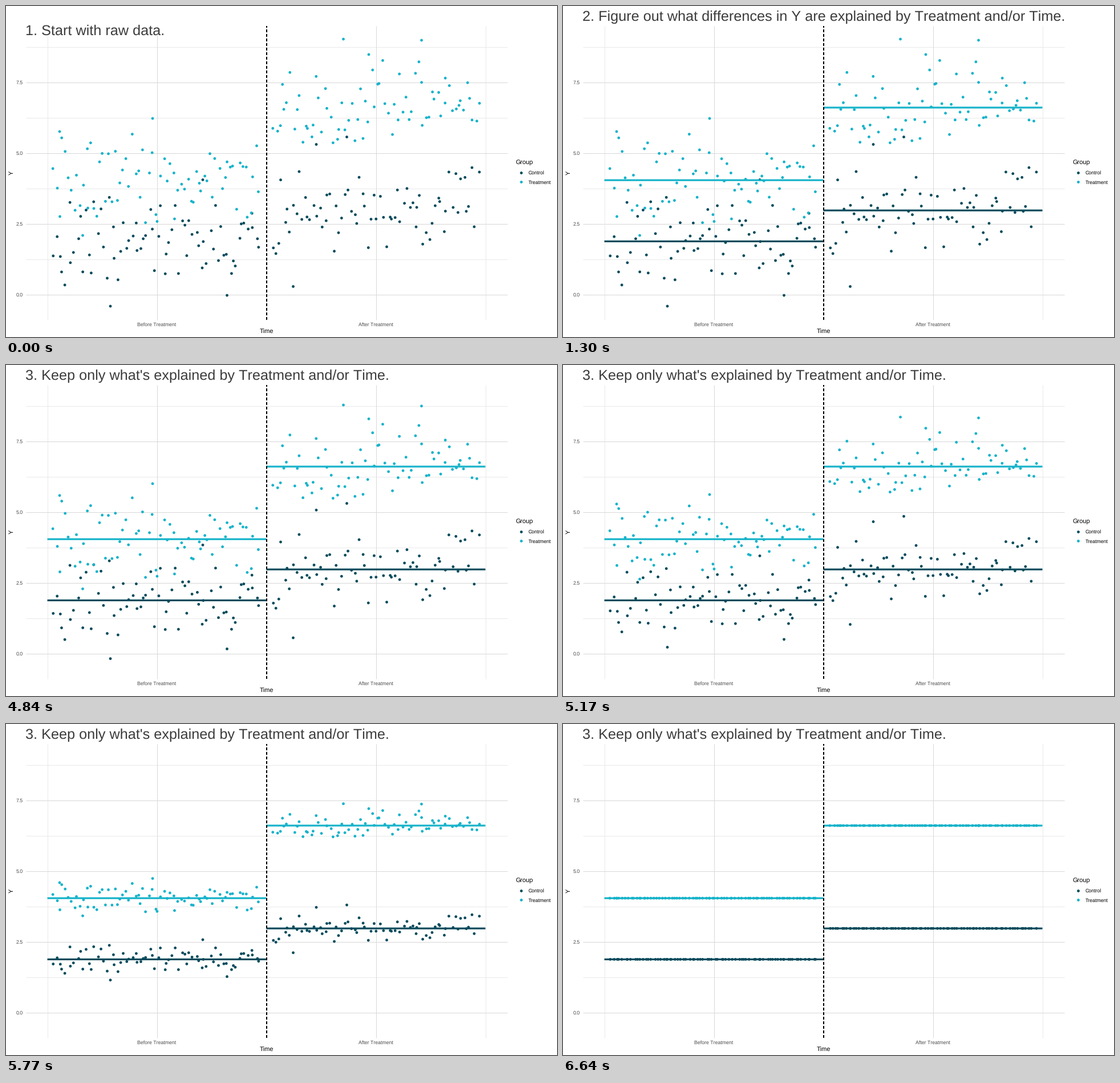
A matplotlib script for the animation above (8 s loop, 966x580 px).

```python
import math

import matplotlib.pyplot as plt
import numpy as np
from matplotlib.animation import FuncAnimation

W, H, DPI = 966, 580, 100
LOOP, STEP = 8000, 20
PX = 72 / DPI  # points per pixel

DARK, TEAL, GREY = "#064B5C", "#16B3CA", "#4D4D4D"
X_BEFORE, X_MID, X_AFTER, X_UNIT = 264.5, 456.7, 648.5, 384
Y_ZERO, Y_UNIT = 506.3, 49.65
PER_GROUP, SPREAD = 75, 43

# Start time, baseline, text
TITLES = [
    (0, 50.6, "1. Start with raw data."),
    (500, 25.6, "2. Figure out what differences in Y are explained "
                "by Treatment and/or Time."),
    (4440, 25.6, "3. Keep only what's explained by Treatment and/or Time."),
]
LINES_AT = 1300
SHRINK_AT, TICK, TICKS = 4440, 200 / 3, 34

# Colour, x centre, mean height, a few extreme points
GROUPS = [
    (DARK, X_BEFORE, 412.4, [(183, 526), (387.5, 507), (345, 304.5)]),
    (DARK, X_AFTER, 358.2, [(503.5, 491.5), (597.5, 229.5), (544, 242.5)]),
    (TEAL, X_BEFORE, 305.2, [(257, 197), (94, 220), (134.5, 402)]),
    (TEAL, X_AFTER, 178.0, [(591.5, 58), (728.5, 60), (636, 85)]),
]

plt.rcParams.update({
    "font.family": "Liberation Sans",
    "text.hinting": "none",
    "text.kerning_factor": 6,
    "lines.scale_dashes": False,
})

fig = plt.figure(figsize=(W / DPI, H / DPI), dpi=DPI, facecolor="white")
ax = fig.add_axes([0, 0, 1, 1])
ax.set(xlim=(0, W), ylim=(H, 0))
ax.axis("off")


def label(x, y, text, size, color="black", ha="left", va="baseline", **kw):
    return ax.text(x, y, text, fontsize=size * PX, color=color, ha=ha,
                   va=va, **kw)


def y_px(value):
    return Y_ZERO - Y_UNIT * value


def grid(xs, values, color, width):
    style = dict(colors=color, linewidths=width * PX, zorder=1)
    ax.hlines([y_px(v) for v in values], 34.6, 879, **style)
    ax.vlines(xs, 34.5, 549.5, **style)


def cloud(rng, centre, mean, extremes):
    """Evenly jittered x, normal y around the mean, plus the extremes."""
    n = PER_GROUP - len(extremes)
    u = (np.arange(n) + rng.uniform(0, 1, n)) / n
    z = rng.normal(0, 1, 3 * n)
    z = z[np.abs(z) < 2][:n]
    core = np.column_stack([centre + X_UNIT * 0.95 * (u - 0.5),
                            mean + SPREAD * (z - z.mean())])
    return np.vstack([extremes, core])


grid([72.5, X_MID, 840.5], [1.25, 3.75, 6.25, 8.75], "#E9E9E9", 1)
grid([X_BEFORE, X_AFTER], [0, 2.5, 5, 7.5], "#DADADA", 1.1)

rng = np.random.default_rng(11)
points = np.vstack([cloud(rng, c, m, far) for _, c, m, far in GROUPS])
means = np.repeat([g[2] for g in GROUPS], PER_GROUP)
colors = np.repeat([g[0] for g in GROUPS], PER_GROUP)
dot = dict(s=(4.8 * PX) ** 2, linewidths=0, zorder=3)
dots = ax.scatter(points[:, 0], points[:, 1], c=colors, **dot)

mean_lines = [
    ax.plot([c - X_UNIT / 2, c + X_UNIT / 2], [m, m], color=color,
            lw=3.2 * PX, solid_capstyle="butt", snap=False, zorder=4)[0]
    for color, c, m, _ in GROUPS
]
ax.plot([X_MID + 0.3] * 2, [549.5, 34.5], color="black", lw=2 * PX,
        ls=(0, (5 * PX, 3 * PX)), dash_capstyle="butt", zorder=5)

for v in (0, 2.5, 5, 7.5):
    label(29.6, y_px(v) + 3.1, f"{v:.1f}", 8.8, GREY, "right")
for x, text in ((X_BEFORE, "Before Treatment"), (X_AFTER, "After Treatment")):
    label(x, 561.2, text, 8.8, GREY, "center")
label(X_MID, 573.4, "Time", 11, ha="center")
label(9.5, 292, "Y", 11, ha="center", va="center", rotation=90)

label(893.8, 276.6, "Group", 11)
for y, text, color in ((291.8, "Control", DARK), (308.3, "Treatment", TEAL)):
    ax.scatter([902.7], [y], c=color, **dot)
    label(915.7, y + 3.2, text, 8.8)

title = label(34.3, 50.6, "", 25.2, "#3C3C3C")


def spread(t):
    """Share of the residual left at time t, with a stepped sine ease."""
    k = math.floor((t + 15 - SHRINK_AT) / TICK) + 1
    u = min(max(k / TICKS, 0), 1)
    return (1 + math.cos(math.pi * u)) / 2


def update(i):
    t = i * STEP
    _, y, text = [entry for entry in TITLES if entry[0] <= t][-1]
    title.set_text(text)
    title.set_y(y)
    for line in mean_lines:
        line.set_visible(t >= LINES_AT)
    ys = means + (points[:, 1] - means) * spread(t)
    dots.set_offsets(np.column_stack([points[:, 0], ys]))
    return [title, dots, *mean_lines]


anim = FuncAnimation(fig, update, frames=LOOP // STEP, interval=STEP,
                     init_func=lambda: update(0), repeat=True,
                     repeat_delay=0, blit=False)
plt.show()
```
